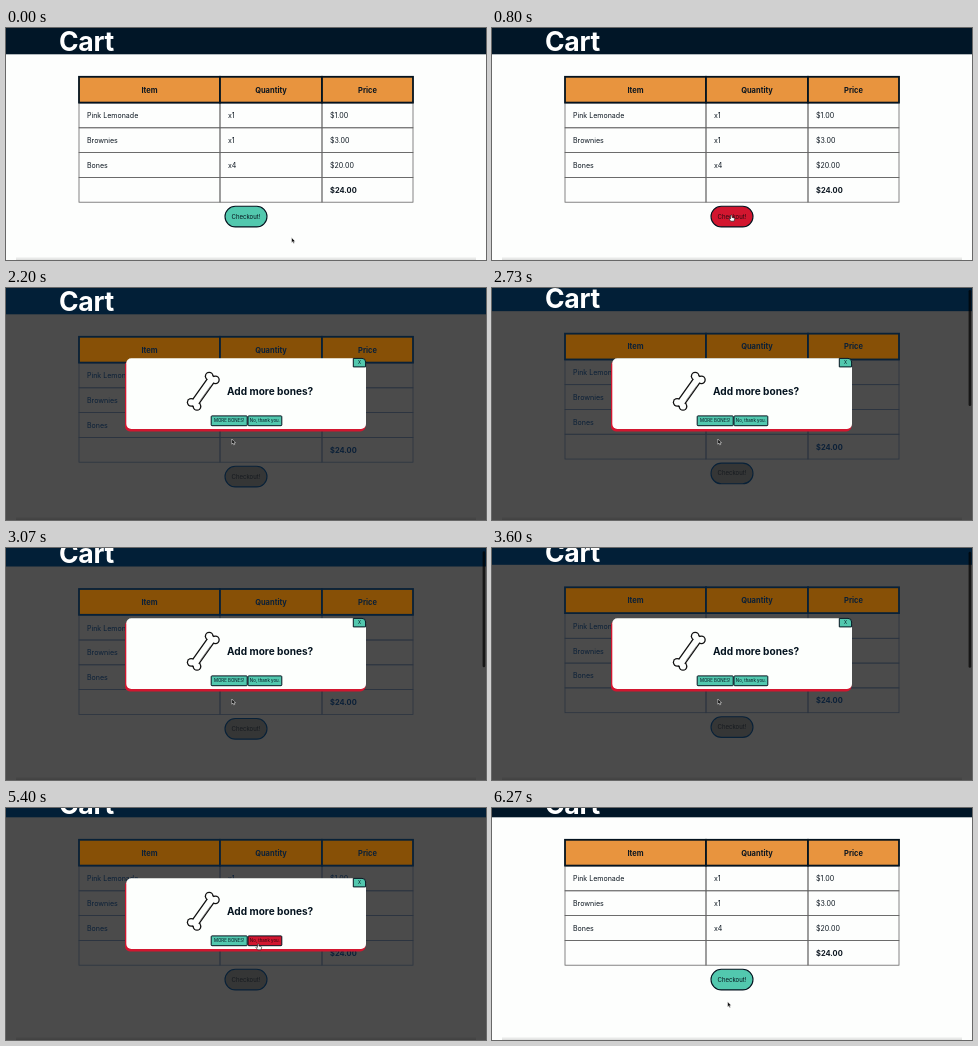
These frames come from a looping animation (480x232 px, 7470 ms). An HTML page:

```html
<!DOCTYPE html>
<html lang="en">
<head>
<meta charset="utf-8">
<title>Cart</title>
<style>
  html, body { margin: 0; width: 100%; height: 100%; overflow: hidden; background: #fdfefd; }
  svg {
    display: block; width: 100%; height: 100%;
    font-family: Inter, "Liberation Sans", sans-serif;
    --page: #fdfefd; --bar: #011627; --orange: #e8943e; --line: #666;
    --ink: #0c1620; --frame: #04131f; --pill: #52c8ae; --pillText: #06131c;
  }
  svg.dim {
    --page: #4b4b4b; --bar: #021f37; --orange: #875006; --line: #2b3440;
    --ink: #0b2038; --frame: #082138; --pill: #353636; --pillText: #171b20;
  }
  .page { fill: var(--page); }
  .bar { fill: var(--bar); }
  .cart { font-size: 26.6px; font-weight: 700; letter-spacing: -.3px; fill: #fff; }
  .head { fill: var(--orange); stroke: var(--frame); stroke-width: 1.8; }
  .grid { fill: none; stroke: var(--line); stroke-width: .8; }
  .cell { font-size: 7.05px; fill: var(--ink); }
  .th { font-size: 7.5px; font-weight: 700; fill: var(--ink); text-anchor: middle; }
  .sum { font-size: 7.5px; font-weight: 700; fill: var(--ink); }
  .mid { text-anchor: middle; }
  .pill rect { fill: var(--pill); stroke: var(--frame); stroke-width: 1.1; }
  .pill text { font-size: 6px; fill: var(--pillText); }
  .key rect, .key path { fill: #52c8ae; stroke: #04131f; stroke-width: 1; }
  .key text { font-size: 4.4px; fill: #04131f; }
  .hot rect { fill: #d2162f; }
  .hot text { fill: #2a0810; }
  .title { font-size: 10.1px; font-weight: 700; fill: #04131f; }
</style>
</head>
<body>
<svg id="stage" viewBox="0 0 480 232" preserveAspectRatio="none">
  <defs>
    <linearGradient id="edge" x2="0" y2="1">
      <stop offset="0" stop-color="#000" stop-opacity="0"/>
      <stop offset="1" stop-color="#000" stop-opacity=".14"/>
    </linearGradient>
  </defs>
  <rect class="page" width="480" height="232"/>
  <g id="content">
    <rect class="bar" width="480" height="26.3"/>
    <text class="cart" x="53" y="23.2">Cart</text>
    <g id="table"></g>
    <g id="checkout" class="pill">
      <rect x="219" y="178.3" width="42" height="20.6" rx="10.3"/>
      <text class="mid" x="240" y="190.6">Checkout!</text>
    </g>
  </g>
  <rect x="10" y="228.5" width="460" height="3.5" fill="url(#edge)"/>
  <rect id="thumb" x="476.6" width="2.6" height="116" rx="1.3" fill="#000"/>
  <g id="modal">
    <rect x="119" y="72.5" width="240.4" height="71" rx="5" fill="#d2162f"/>
    <rect x="120.3" y="70.2" width="239.7" height="70.8" rx="5" fill="#fdfffd"/>
    <g class="key">
      <path d="M347.3 70.4H356q3.6 0 3.6 3.6V78.9H347.3Z" stroke-width=".8"/>
      <text class="mid" x="353.6" y="76.3">X</text>
    </g>
    <g id="bone" stroke-linecap="round"></g>
    <text class="title" x="221" y="107.4">Add more bones?</text>
    <g class="key">
      <rect x="205.2" y="127.9" width="36" height="9.8" rx=".8"/>
      <text class="mid" x="223.2" y="134.3">MORE BONES!</text>
    </g>
    <g id="decline" class="key">
      <rect x="242" y="127.9" width="33.8" height="9.8" rx=".8"/>
      <text class="mid" x="258.9" y="134.3">No, thank you.</text>
    </g>
  </g>
  <g id="cursor">
    <path id="arrow" d="M0 0V5.2L1.2 4.1 2 5.9 2.9 5.5 2.1 3.8H3.7Z" fill="#000" stroke="#fff" stroke-width=".5"/>
    <path id="hand" d="M-.7 .3Q0-.5 .7 .3V2.2L3 2.8Q3.5 3 3.4 3.8L2.8 6H-.6L-2.2 3.7Q-2.2 2.8-.7 3.5Z" fill="#fff" stroke="#111" stroke-width=".6"/>
  </g>
</svg>
<script>
  const LOOP = 7470, OPEN = 1400, CLOSE = 5530;
  const $ = id => document.getElementById(id);

  function add(parent, tag, attrs, text) {
    const el = document.createElementNS("http://www.w3.org/2000/svg", tag);
    for (const key in attrs) el.setAttribute(key, attrs[key]);
    if (text) el.textContent = text;
    parent.append(el);
  }

  function buildTable() {
    const table = $("table"), cols = [73, 214, 316, 407];
    const rows = [
      ["Pink Lemonade", "x1", "$1.00"],
      ["Brownies", "x1", "$3.00"],
      ["Bones", "x4", "$20.00"],
      ["", "", "$24.00"]
    ];
    const top = 75, step = 24.8;
    rows.forEach((row, r) => row.forEach((text, c) => {
      const y = top + r * step;
      add(table, "rect", { class: "grid", x: cols[c], y, width: cols[c + 1] - cols[c], height: step });
      add(table, "text", { class: r === 3 ? "sum" : "cell", x: cols[c] + 8, y: y + 15.4 }, text);
    }));
    ["Item", "Quantity", "Price"].forEach((text, c) => {
      const width = cols[c + 1] - cols[c];
      add(table, "rect", { class: "head", x: cols[c], y: 48.8, width, height: 25.8 });
      add(table, "text", { class: "th", x: cols[c] + width / 2, y: 64.6 }, text);
    });
  }

  // A wide dark pass under a narrower white one leaves an even outline.
  function buildBone() {
    const bone = $("bone");
    const knobs = [[203.2, 88.2], [209.4, 91.8], [185.2, 114.3], [191, 118.4]];
    for (const [color, grow] of [["#111", 0], ["#fdfffd", 1.3]]) {
      add(bone, "path", { d: "M205.5 91.5L188.8 115", stroke: color, "stroke-width": 9 - 2 * grow });
      for (const [cx, cy] of knobs) add(bone, "circle", { cx, cy, r: 4.4 - grow, fill: color });
    }
    add(bone, "path", { d: "M204.6 98L194.6 112", stroke: "#777", "stroke-width": .7 });
  }

  const ease = k => k * k * (3 - 2 * k);

  // keys: [time, ...values], eased between neighbours
  function track(keys, t) {
    let i = keys.findIndex(k => k[0] > t);
    if (i < 0) return keys[keys.length - 1].slice(1);
    if (i === 0) return keys[0].slice(1);
    const a = keys[i - 1], b = keys[i];
    const k = ease((t - a[0]) / (b[0] - a[0]));
    return a.slice(1).map((v, n) => v + (b[n + 1] - v) * k);
  }

  const path = [
    [70, 285.6, 209.6], [800, 239.3, 187.2], [1800, 239.3, 187.2], [2200, 225.8, 151],
    [4070, 225.8, 151], [4730, 245, 147], [5000, 245, 147], [5400, 252.2, 135.8],
    [5800, 252.2, 135.8], [6270, 235.6, 193.8]
  ];
  const scrolling = [[2470, 0], [3070, 7.8], [3200, 8.1], [3270, 8.1], [3600, 9.5], [4000, 17]];
  const thumbFade = [[2470, 0], [2600, .7], [4330, .7], [4600, 0]];

  const inside = (x, y, l, t, r, b) => x > l && x < r && y > t && y < b;
  const show = (el, on) => el.style.display = on ? "" : "none";

  function draw(t) {
    const open = t >= OPEN && t < CLOSE;
    const [x, y] = track(path, t);
    const [scroll] = track(scrolling, t);
    const overPill = !open && inside(x, y, 219, 178 - scroll, 261, 199 - scroll);
    const overNo = open && inside(x, y, 242, 128, 276, 138);

    $("stage").classList.toggle("dim", open);
    $("content").setAttribute("transform", `translate(0 ${-scroll})`);
    $("checkout").classList.toggle("hot", overPill);
    $("decline").classList.toggle("hot", overNo);
    show($("modal"), open);

    $("thumb").setAttribute("y", 1 + scroll * .3);
    $("thumb").setAttribute("opacity", track(thumbFade, t)[0]);

    $("cursor").setAttribute("transform", `translate(${x} ${y})`);
    show($("hand"), overPill || overNo);
    show($("arrow"), !overPill && !overNo);
  }

  buildTable();
  buildBone();
  draw(0);
  const start = performance.now();
  (function tick() {
    draw((performance.now() - start) % LOOP);
    requestAnimationFrame(tick);
  })();
</script>
</body>
</html>
```
